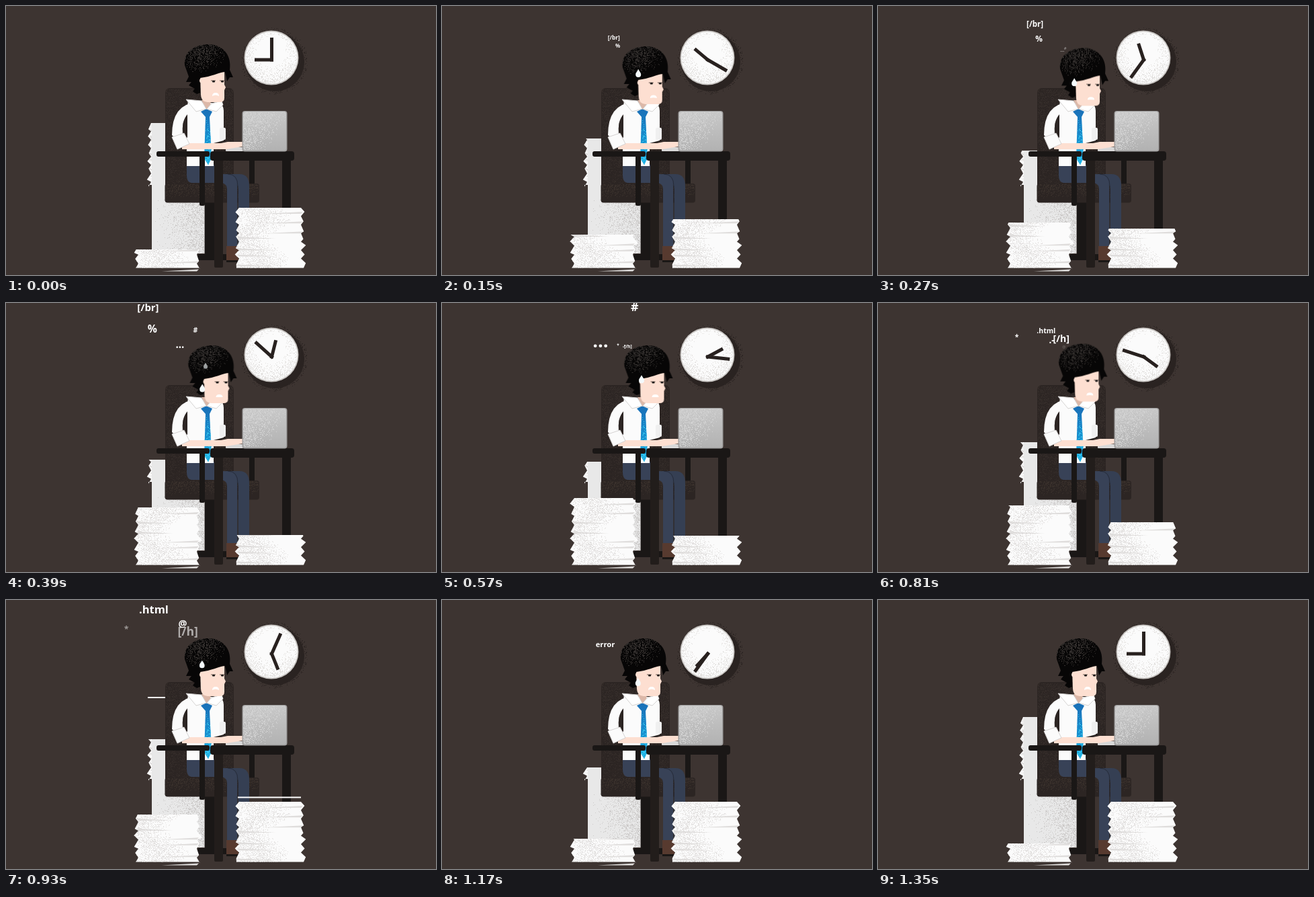
Write an HTML page with a canvas that moves like this. It is 640 by 400 pixels and loops after 1.38 s.

```html
<!DOCTYPE html>
<html>
<head>
<meta charset="utf-8">
<style>
  html, body { margin: 0; width: 100%; height: 100%; overflow: hidden; background: #3d3431; }
  canvas { display: block; }
</style>
</head>
<body>
<canvas id="stage" width="640" height="400"></canvas>
<script>
const LOOP = 1380, STEP = 30, CYCLE = 1350, FLOOR = 389.5;
const INK = '#1a1716', CHAIR = '#2c2523', SKIN = '#fddfd1', PAPER = '#fbfbfb';
const stage = document.getElementById('stage').getContext('2d');

let seed = 7;
const random = () => (seed = seed * 16807 % 2147483647) / 2147483647;
const circle = (x, y, r) => `M${x - r},${y}a${r},${r} 0 1 0 ${2 * r},0a${r},${r} 0 1 0 ${-2 * r},0`;
const rect = (x, y, w, h) => `M${x},${y}h${w}v${h}h${-w}z`;

// Piecewise linear value through [time, value] points
function track(t, ...points) {
  const i = points.findIndex(([time]) => time > t);
  if (i < 0) return points[points.length - 1][1];
  const [t0, a] = points[i - 1], [t1, b] = points[i];
  return a + (b - a) * (t - t0) / (t1 - t0);
}

function layer(draw) {
  const canvas = document.createElement('canvas');
  canvas.width = 640;
  canvas.height = 400;
  draw(canvas.getContext('2d'));
  return canvas;
}

function fill(c, d, color) {
  c.fillStyle = color;
  c.fill(new Path2D(d));
}

function box(c, x, y, w, h, color, r = 0) {
  c.fillStyle = color;
  c.beginPath();
  c.roundRect(x, y, w, h, r);
  c.fill();
}

function fade(c, y0, y1, from, to) {
  const gradient = c.createLinearGradient(0, y0, 0, y1);
  gradient.addColorStop(0, from);
  gradient.addColorStop(1, to);
  return gradient;
}

function grain(c, d, color, [x, y, w, h], density) {
  c.save();
  c.clip(new Path2D(d));
  c.fillStyle = color;
  for (let i = 0; i < w * h * .8; i++) {
    const u = random(), v = random();
    if (random() < density(u, v)) c.fillRect(Math.floor(x + u * w), Math.floor(y + v * h), 1, 1);
  }
  c.restore();
}

// Ragged sheets: both edges zigzag, with a thin shadow under each fold
function pile(c, x, w, top, bottom, fold) {
  const left = [], right = [], shadows = [];
  for (let y = top; y < bottom - 4; y += fold) {
    const reachLeft = 3 + random() * 4, reachRight = 3 + random() * 6;
    const tipLeft = y + fold * (.4 + random() * .4), tipRight = y + fold * (.4 + random() * .4);
    left.unshift(`${x - reachLeft},${tipLeft}`, `${x},${y}`);
    right.push(`${x + w},${y}`, `${x + w + reachRight},${tipRight}`);
    shadows.push(random() < .5
      ? `M${x - 3},${tipLeft}L${x + w * .6},${tipLeft + 3}L${x},${tipLeft + 3}z`
      : `M${x + w + 3},${tipRight}L${x + w * .4},${tipRight + 3}L${x + w},${tipRight + 3}z`);
  }
  const d = `M${right.join('L')}L${x + w + 4},${bottom}H${x - 4}L${left.join('L')}z`;
  fill(c, d, PAPER);
  grain(c, d, '#e2e0df', [x - 7, top, w + 15, bottom - top],
    (u, v) => .75 - Math.abs(u - .25 - .15 * Math.sin(v * 9)) * 1.8);
  fill(c, shadows.join(''), '#dfdddc');
}

const wall = layer(c => {
  box(c, 0, 0, 640, 400, '#3d3431');
  fill(c, circle(400, 83, 44), '#2a2321');
  grain(c, circle(399, 82, 50), '#2a2321', [349, 32, 100, 100],
    (u, v) => 1.6 - 3 * Math.hypot(u - .5, v - .5));
  fill(c, circle(395, 77, 40.5), '#c9c6c3');
  fill(c, circle(395, 77, 38.8), PAPER);
  grain(c, circle(395, 77, 38), '#e2e0de', [355, 37, 80, 80],
    (u, v) => Math.hypot(u - .5, v - .4) * 2 - .5);
});

const backStack = layer(c => {
  pile(c, 216, 60, 174, 266, 12.5);
  fill(c, rect(217, 174, 78.5, 194), '#e8e8e8');
  grain(c, rect(217, 266, 78, 102), '#cccac9', [217, 266, 78, 102], u => u * u * .8);
});
const leftStack = layer(c => pile(c, 197, 87, 290, FLOOR, 13.3));
const rightStack = layer(c => pile(c, 347, 92, 300, FLOOR, 12.6));

const worker = layer(c => {
  box(c, 237, 122, 102, 150, CHAIR, 7);
  grain(c, rect(238, 124, 100, 140), '#352d2a', [237, 122, 102, 150], (u, v) => .8 - .6 * v);
  box(c, 362, 226, 8, 42, INK);
  box(c, 296, 290, 14, 86, INK);
  box(c, 285, 369, 62, 9, INK, 3);
  box(c, 236.5, 264, 140.5, 28.5, CHAIR, 4);
  grain(c, rect(238, 265, 138, 26), '#3a312c', [237, 264, 140, 28], (u, v) => .8 - v);

  fill(c, 'M315,250H348Q362,250 362,268V358H346V272Q346,263 335,263z', '#353f53');
  fill(c, 'M269,236H312V250H330Q344,250 344,268V358H329V272Q329,263 318,263H276Q269,262 269,252z', '#384257');
  c.strokeStyle = '#262c39';
  c.stroke(new Path2D('M330,250Q345,250 345,268V358'));
  fill(c, rect(328, 357, 18, 24), '#573a2f');
  fill(c, rect(328, 378, 20, 3), INK);

  fill(c, 'M284,143Q247,146 247,192L255,200L264,190Q260,172 271,160z', PAPER);
  fill(c, 'M271,140L292,144H318Q324,148 324,156V200L309,204V238H269V160z', PAPER);
  fill(c, 'M270,161Q261,173 263,190L270,196z', CHAIR);
  box(c, 318, 181, 9, 18, '#f0f0f0', 2);
  fill(c, 'M290,157L298,153L307,157L303,165L306,226L301,236L295,227L297,165z',
    fade(c, 157, 236, '#1a72b9', '#16a9e2'));
  grain(c, 'M297,165H304L306,226L301,236L295,227z', '#35c8ee', [294, 160, 13, 76], (u, v) => v * v);
  fill(c, 'M291,140H305L304,148L298,154z', '#dcb8a8');
  c.strokeStyle = '#d5d3d2';
  for (const collar of ['M268,139L291,141L298,153L283,157z', 'M299,153L306,145L321,141L323,147L313,157z']) {
    fill(c, collar, '#fff');
    c.stroke(new Path2D(collar));
  }
  box(c, 327, 210, 26, 6, '#d8d8d8', 1);
  fill(c, 'M262,204H320L330,202H352V209L328,213H262z', SKIN);
  const cuff = 'M247,195L265,189L273,205L255,213z';
  fill(c, cuff, PAPER);
  c.stroke(new Path2D(cuff));

  box(c, 224, 216, 79, 8, INK, 3);
  box(c, 288, 220, 8, 77, INK, 2);
  box(c, 411, 226, 13, 135, INK);
  box(c, 310, 226, 13, 163, '#221d1b', 2);
  box(c, 304, 216, 125, 14, INK, 4);

  box(c, 351.5, 156, 67, 60.5, '#a09f9f', 4);
  box(c, 353, 157, 64, 58, fade(c, 157, 215, '#c8c8c8', '#b2b2b2'), 3);
  grain(c, rect(353, 158, 64, 56), '#d2d2d2', [353, 157, 64, 58], (u, v) => 1.1 - u - .5 * v);
});

const head = layer(c => {
  fill(c, 'M289,98H325V117L327,121L325,125V137Q325,143 318,143H300Q290,142 290,132z', SKIN);
  const hair = 'M266,88C264,65 285,57 302,57C325,58 336,75 333,95L338,106L333,106L329,112L326,98' +
    'C316,99 306,105 289,107L289,129L284,131L278,127L281,123L272,118L276,113L268,113L272,105z';
  fill(c, hair, '#070606');
  grain(c, hair, '#34302e', [266, 57, 68, 55], (u, v) => 1 - Math.hypot(u - .3, v - .15) * 1.6);
  fill(c, circle(291.5, 111, 3.5), SKIN);
  for (const x of [305, 318]) {
    box(c, x, 110.5, 7, 1, '#6b5a53');
    box(c, x + 2, 111, 4, 2.5, INK, 1);
  }
});

// Symbols leave the head and keep drifting, rising and growing: text, start, drift, rise, growth
const symbols = [
  ['[/br]', 30, -74, 67, 11],
  ['%', 60, -73, 34, 13],
  ['#', 250, 11, 77, 16],
  ['...', 240, -51, 13, 27],
  ['.-', 440, -21, 13, 9],
  ['*', 500, -92, 22, 7],
  ['[/h]', 510, -7, 19, 12],
  ['.html', 700, -101, 92, 20],
  ['@', 800, -46, 100, 29],
  ['error', 1090, -175, 5, 31]
];

function drawSymbol([text, start, drift, rise, growth], t) {
  const p = (t - start) / 400, size = 5 + growth * p;
  if (p <= 0 || p >= 1.2) return;
  stage.globalAlpha = Math.max(0, Math.min(1, p * 8, (1.2 - p) * 4, (CYCLE - t) / 60));
  stage.font = `bold ${size}px "Open Sans", sans-serif`;
  stage.textAlign = 'center';
  stage.textBaseline = 'middle';
  stage.fillStyle = '#fff';
  stage.fillText(text, 278 + drift * p, 67 - rise * p + size * .09);
  stage.globalAlpha = 1;
}

function drawHand(angle, length) {
  stage.save();
  stage.translate(395.5, 80);
  stage.rotate(angle);
  box(stage, -2.5, -length, 5, length + 2.5, '#28211f');
  stage.restore();
}

function drawStack(image, top) {
  top = Math.round(top);
  stage.drawImage(image, 0, top, 640, 400 - top, 0, top, 640, 400 - top);
}

function drawSheet(t, x, w, landing, top) {
  const wait = landing - t;
  if (wait > 0 && wait < 90) box(stage, x, top - wait * .75, w, 2, '#fff');
}

const nod = t => track(t, [0, 0], [300, 1], [750, 1], [900, 0]);

function drawDrop(t, start) {
  const p = (t - start) / 390;
  if (p <= 0 || p >= 1) return;
  const size = Math.min(1, .45 + p * 4);
  stage.save();
  stage.globalAlpha = Math.min(1, p * 8, (1 - p) * 8);
  stage.translate(291 + 6 * nod(start), 90 + 43 * p);
  stage.scale(size, size);
  fill(stage, 'M0,-6C2,-2 4,-1 4,2A4,4 0 0 1 -4,2C-4,-1 -2,-2 0,-6z', '#f4fafc');
  stage.restore();
}

function frame(now) {
  const t = Math.floor(now % LOOP / STEP) * STEP;
  const turn = t / CYCLE * Math.PI * 2;
  stage.drawImage(wall, 0, 0);
  drawHand(turn - Math.PI / 2, 25.5);
  drawHand(turn * 3, 33);

  drawStack(backStack, track(t, [0, 174], [500, 249], [720, 207], [930, 207], [1170, 249], [1350, 174]));
  drawSheet(t, 211, 26, 1014, 207);
  stage.drawImage(worker, 0, 0);

  const k = nod(t);
  stage.save();
  stage.translate(5.5 * k, 6 * k);
  stage.drawImage(head, 0, 0);
  fill(stage, `M307,134Q307,${129 + k} 312,${129 + k}T317,134Q312,${131 + 3 * k} 307,134z`, '#fff');
  stage.restore();
  for (const start of [60, 360, 880]) drawDrop(t, start);

  drawStack(leftStack, track(t, [0, 362], [480, 290], [740, 290], [1220, 362]));
  drawSheet(t, 197, 86, 736, 290);
  drawStack(rightStack, track(t, [0, 300], [390, 345], [720, 347], [920, 300]));
  drawSheet(t, 345, 94, 940, 300);

  for (const symbol of symbols) drawSymbol(symbol, t);
  requestAnimationFrame(() => frame(performance.now()));
}
frame(0);
</script>
</body>
</html>
```
